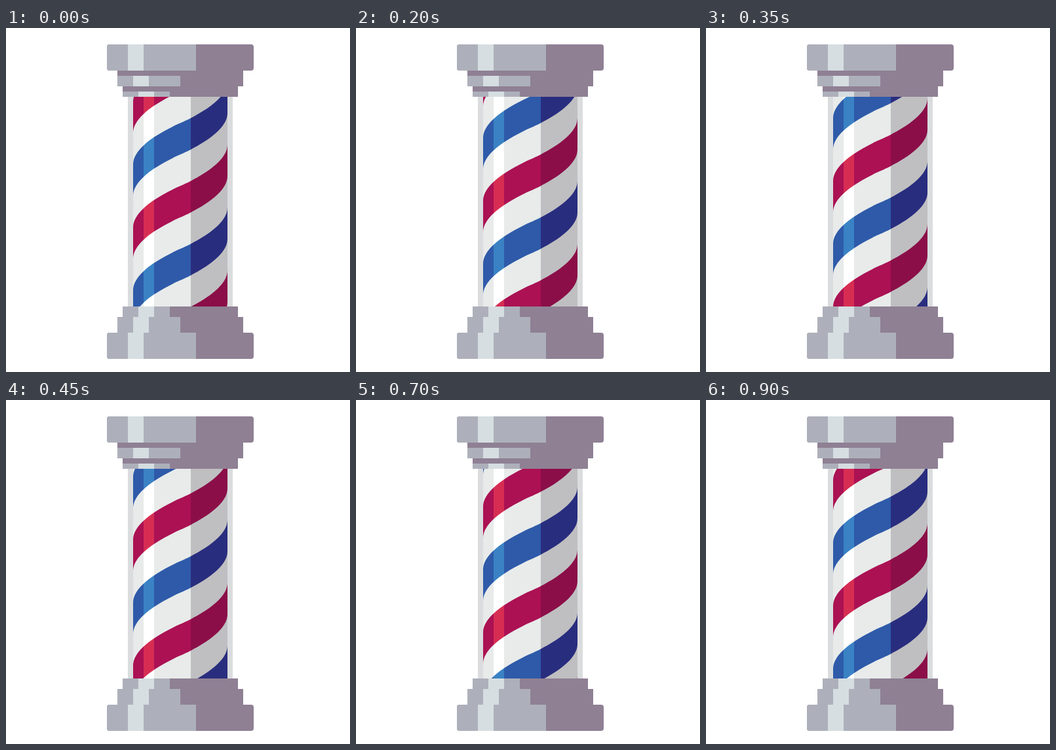
Write an HTML page that moves like this. It is 525 px wide and 525 px high and loops after 0.95 s.

```html
<!DOCTYPE html>
<html lang="en">
<head>
<meta charset="utf-8">
<title>Barber pole</title>
<style>
  html, body { margin: 0; width: 100%; height: 100%; overflow: hidden; background: #fff; }
  svg { display: block; width: 100vw; height: 100vh; }
</style>
</head>
<body>
<svg id="stage" viewBox="0 0 525 525" xmlns="http://www.w3.org/2000/svg"></svg>
<script>
const NS = 'http://www.w3.org/2000/svg';
const stage = document.getElementById('stage');

const GREY = '#adb0ba', LIGHT = '#d6dee1', DARK = '#8f8094';
const TOP = 105, BOTTOM = 425, LEFT = 194, RIGHT = 338, MID = 266;
const PERIOD = 192, WIDTH = 48;
const STEP = 50, STEPS = 19;

function add(parent, tag, attrs) {
  const el = document.createElementNS(NS, tag);
  for (const key in attrs) el.setAttribute(key, attrs[key]);
  parent.appendChild(el);
  return el;
}

function box(parent, x1, y1, x2, y2, fill) {
  return add(parent, 'rect', { x: x1, y: y1, width: x2 - x1, height: y2 - y1, fill });
}

// One slanted stripe whose upper edge crosses the middle of the pole at y.
function stripe(y) {
  const b = y + WIDTH;
  return `M${LEFT} ${y + 63}` +
    `C${LEFT} ${y + 36} ${MID - 26} ${y + 11.5} ${MID} ${y}` +
    `C${MID + 26} ${y - 11.5} ${RIGHT} ${y - 36} ${RIGHT} ${y - 63}` +
    `V${b - 63}` +
    `C${RIGHT} ${b - 36} ${MID + 26} ${b - 11.5} ${MID} ${b}` +
    `C${MID - 26} ${b + 11.5} ${LEFT} ${b + 36} ${LEFT} ${b + 63}Z`;
}

const stripes = y => [-1, 0, 1, 2].map(k => stripe(y + k * PERIOD)).join('');
const bluePath = stripes(145);
const redPath = stripes(241);

// Vertical light bands: left, right, white, red, blue
const bands = [
  [194, 210, '#e8ebea', '#ab1153', '#2e5aa9'],
  [210, 226, '#ffffff', '#d72d53', '#3a82c4'],
  [226, 282, '#e8ebea', '#ab1153', '#2e5aa9'],
  [282, 338, '#bfbfc1', '#8b0e48', '#292d7e']
];

box(stage, 186, TOP, 346, BOTTOM, '#dadcde');

const defs = add(stage, 'defs', {});
const movers = bands.map(([x1, x2, white, red, blue], i) => {
  const clip = add(defs, 'clipPath', { id: 'band' + i });
  box(clip, x1, TOP, x2, BOTTOM, '#000');
  box(stage, x1, TOP, x2, BOTTOM, white);
  const frame = add(stage, 'g', { 'clip-path': `url(#band${i})` });
  const mover = add(frame, 'g', {});
  add(mover, 'path', { d: redPath, fill: red });
  add(mover, 'path', { d: bluePath, fill: blue });
  return mover;
});

// A metal tier: dark base, grey lit side, bright streak.
function tier(y1, y2, x1, x2, lit, shine, round) {
  let parent = stage;
  if (round) {
    const id = 'cap' + y1;
    const clip = add(defs, 'clipPath', { id });
    box(clip, x1, y1, x2, y2, '#000').setAttribute('rx', 4);
    parent = add(stage, 'g', { 'clip-path': `url(#${id})` });
  }
  box(parent, x1, y1, x2, y2, DARK);
  box(parent, x1, y1, lit, y2, GREY);
  box(parent, shine, y1, shine + 24, y2, LIGHT);
}

tier(25, 65, 154, 378, 290, 186, true);
box(stage, 170, 65, 362, 73, DARK);
tier(73, 89, 170, 362, 266, 194);
box(stage, 178, 89, 354, 97, DARK);
tier(97, 105, 178, 354, 250, 202);

tier(425, 441, 178, 354, 250, 202);
tier(441, 465, 170, 362, 266, 194);
tier(465, 505, 154, 378, 290, 186, true);

function draw(ms) {
  const step = Math.floor(ms / STEP) % STEPS;
  const shift = -PERIOD * step / STEPS;
  for (const m of movers) m.setAttribute('transform', `translate(0 ${shift})`);
}

let start = null;
function tick(now) {
  if (start === null) start = now;
  draw(Math.max(0, now - start));
  requestAnimationFrame(tick);
}
draw(0);
requestAnimationFrame(tick);
</script>
</body>
</html>
```
